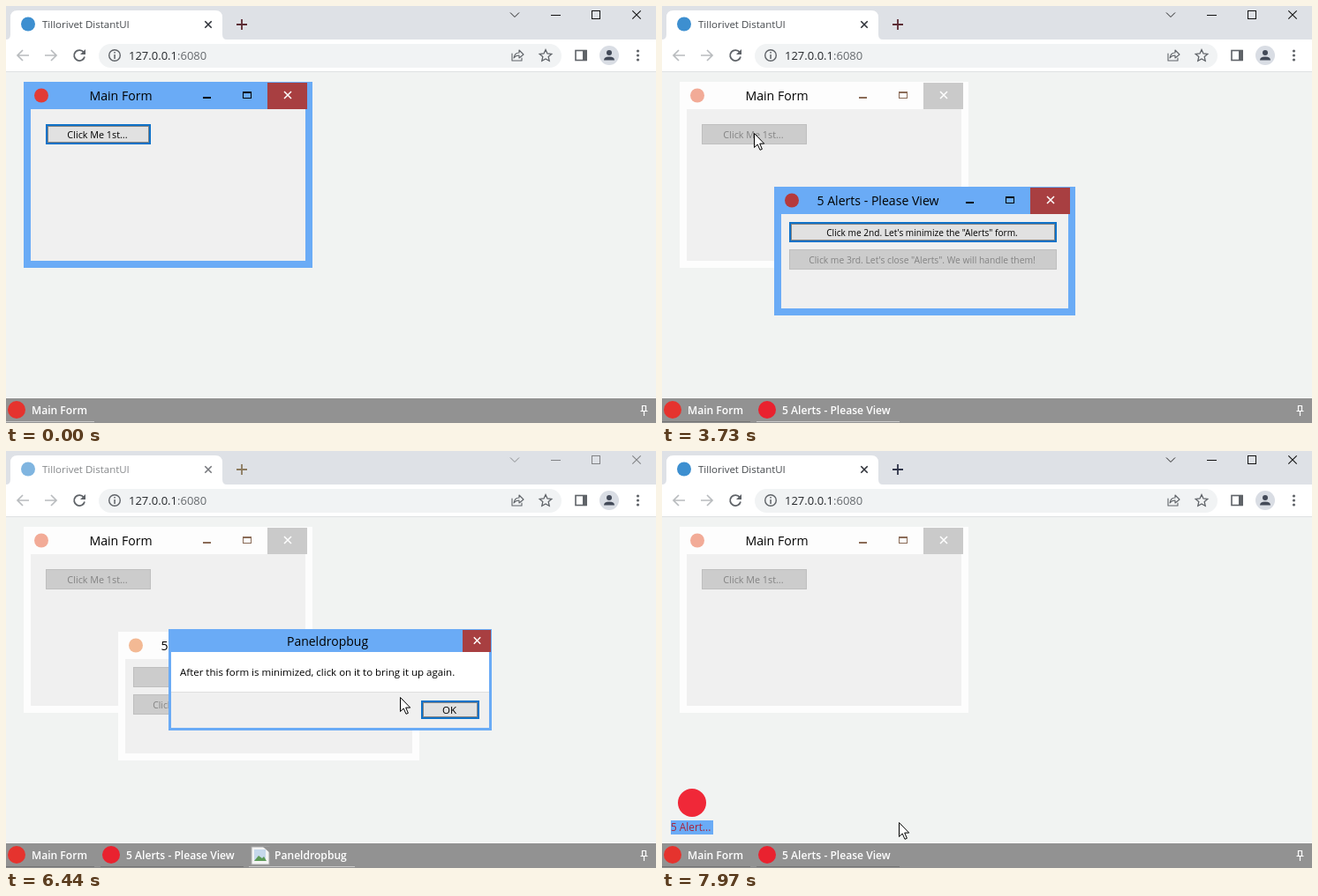
An HTML page for the animation above (8 s loop, 736x473 px).

```html
<!DOCTYPE html>
<html lang="en">
<head>
<meta charset="utf-8">
<title>Forms demo</title>
<style>
  html, body { margin: 0; width: 100%; height: 100%; overflow: hidden; background: #f1f3f2; }
  svg { display: block; width: 736px; height: 473px; }
  text { font-family: "Open Sans", "Noto Sans", sans-serif; white-space: pre; }
</style>
</head>
<body>
<svg id="stage" viewBox="0 0 736 473"></svg>
<script>
const LOOP = 8000;
const BLUE = '#6aabf6', FACE = '#f0f0f0';

const rect = (x, y, w, h, fill, extra = '') =>
  `<rect x="${x}" y="${y}" width="${w}" height="${h}" fill="${fill}" ${extra}/>`;
const frame = (x, y, w, h, color, extra = '') =>
  rect(x + .5, y + .5, w - 1, h - 1, 'none', `stroke="${color}" ${extra}`);
const dot = (x, y, r, fill, extra = '') => `<circle cx="${x}" cy="${y}" r="${r}" fill="${fill}" ${extra}/>`;
const line = (d, color, width = 1, extra = '') =>
  `<path d="${d}" fill="none" stroke="${color}" stroke-width="${width}" ${extra}/>`;
const text = (x, y, size, fill, str, extra = '') =>
  `<text x="${x}" y="${y}" font-size="${size}" fill="${fill}" ${extra}>${str}</text>`;
const centered = (x, y, size, fill, str) => text(x, y, size, fill, str, 'text-anchor="middle"');
const group = (id, body) => `<g id="${id}">${body}</g>`;
const cross = (x, y, r, color, width) =>
  line(`M${x - r} ${y - r}l${2 * r} ${2 * r}M${x + r} ${y - r}l${-2 * r} ${2 * r}`, color, width);

function disabledButton(x, y, w, h, label, size) {
  return rect(x, y, w, h, '#cccccc') + frame(x, y, w, h, '#bfbfbf') +
    centered(x + w / 2 - 1, y + h / 2 + 4, size, '#838383', label);
}

function focusButton(id, x, y, w, h, label, size) {
  const dots = frame(x + 2, y + 2, w - 4, h - 4, '#222', 'stroke-dasharray="1 1"');
  return rect(x, y, w, h, '#e1e1e1') +
    rect(x + 1, y + 1, w - 2, h - 2, 'none', 'stroke="#0f72c8" stroke-width="2"') + dots +
    group(id, rect(x, y, w, h, '#deeefa') + frame(x, y, w, h, '#1f5f92') + dots) +
    centered(x + w / 2 - 1, y + h / 2 + 4, size, '#000', label);
}

function formWindow(x, y, w, h, title, titleX, active, iconColor) {
  const right = x + w, mid = y + 15, ink = active ? '#000' : '#8a6b57';
  return rect(x, y, w, h, active ? BLUE : '#fdfdfd') +
    rect(x + 8, y + 31, w - 16, h - 39, FACE) +
    dot(x + 20, y + 15.5, 8, iconColor) +
    centered(titleX, y + 21, 14.1, '#000', title) +
    rect(right - 124, mid + 2, 9, 2, ink) +
    frame(right - 79, mid - 4, 10, 8, ink) + rect(right - 79, mid - 4, 10, 2, ink) +
    rect(right - 51, y + 1, 45, 30, active ? '#a83f41' : '#cacaca') +
    cross(right - 28, mid, 4, '#fff', 1.5);
}

function mainForm(active) {
  const button = active ? focusButton('hotFirst', 45, 134, 119, 23, 'Click Me 1st...', 10.8)
    : disabledButton(45, 134, 119, 23, 'Click Me 1st...', 10.8);
  return formWindow(20, 86, 327, 211, 'Main Form', 130, active, active ? '#e23b36' : '#f2ab97') + button;
}

function alertsForm(active) {
  const label = 'Click me 2nd. Let\'s minimize the "Alerts" form.';
  const button = active ? focusButton('hotSecond', 144, 245, 303, 23, label, 10.15)
    : disabledButton(144, 245, 303, 23, label, 10.15);
  return formWindow(127, 205, 341, 146, '5 Alerts - Please View', 244.5, active, active ? '#b53a3c' : '#f3b994') +
    button + disabledButton(144, 276, 303, 23, 'Click me 3rd. Let\'s close "Alerts". We will handle them!', 10.3);
}

function dialog() {
  return rect(184, 202, 366, 115, BLUE) + rect(187, 228, 360, 46, '#fff') +
    rect(187, 273, 360, 41, FACE) + rect(187, 273, 360, 1, '#dfdfdf') +
    centered(364, 221, 14, '#000', 'Paneldropbug') +
    rect(517, 203, 32, 25, '#a83f41') + cross(533.5, 215, 3.7, '#fff', 1.5) +
    text(197, 255, 11.5, '#000', 'After this form is minimized, click on it to bring it up again.') +
    focusButton('hotOk', 470, 283, 66, 21, 'OK', 11.5);
}

function browser() {
  const ink = '#5f6368', round = 'stroke-linecap="round" stroke-linejoin="round"';
  const arrow = (x, dir) => line(`M${x - 6 * dir} 56h${13 * dir}M${x} 50l${-6 * dir} 6l${6 * dir} 6`, '#b9bcbf', 1.7);
  return rect(0, 0, 736, 38, '#dee1e6') +
    '<path d="M0 38q5 0 5-6V13q0-8 8-8h224q8 0 8 8v19q0 6 5 6z" fill="#fff"/>' +
    rect(0, 38, 736, 36, '#fff') + rect(0, 74, 736, 1, '#dfe1e3') +
    group('tab', dot(25, 20.5, 8, '#3d8fd0') + text(41, 25, 11.5, '#45494d', 'Tillorivet DistantUI') +
      cross(229, 21, 3.7, '#2e3138', 1.6)) +
    group('plus', '<path d="M261 21h12M267 15v12" fill="none" stroke-width="1.8"/>') +
    group('controls', line('M571 7.5l5 5 5-5', '#222') + rect(617, 10, 11, 1, '#111') +
      frame(663, 5, 10, 10, '#111') + cross(714, 10, 4.7, '#111', 1.1)) +
    arrow(19, 1) + arrow(51, -1) +
    line('M88 52.5a6 6 0 1 0 1 5', ink, 1.8) + `<path d="M90 49v6h-6z" fill="${ink}"/>` +
    rect(105, 43, 524, 27, '#f1f3f4', 'rx="13.5"') +
    dot(123, 56, 6.3, 'none', `stroke="${ink}" stroke-width="1.4"`) +
    rect(122.3, 55, 1.5, 5, ink) + rect(122.3, 52, 1.5, 1.6, ink) +
    `<text x="139" y="60.5" font-size="13" fill="#25282c">127.0.0.1<tspan fill="#666a6e">:6080</tspan></text>` +
    line('M573 54v8h11v-3M575 59q1-6 6-6v-3l5 5-5 4v-3q-4 0-6 3', ink, 1.1, round) +
    line('M611 49.5l2 4.4 4.8.5-3.6 3.2 1 4.7-4.2-2.4-4.2 2.4 1-4.7-3.6-3.2 4.8-.5z', ink, 1.3) +
    rect(645, 50.5, 12, 11, 'none', `stroke="${ink}" stroke-width="1.6"`) + rect(653, 50, 5, 12, ink) +
    dot(683, 56, 11, '#d9dde4') + dot(683, 53, 3, '#434a58') +
    '<path d="M677 61.5q0-4 6-4t6 4z" fill="#434a58"/>' +
    [51, 56, 61].map(y => dot(715.5, y, 1.6, ink)).join('');
}

function taskItem(id, x, w, label, icon) {
  return group(id, icon + text(x + 29, 463, 12.1, '#fff', label, 'font-weight="600"') +
    `<rect id="${id}Line" x="${x}" y="471" width="${w}" height="1"/>`);
}

function taskbar() {
  const broken = rect(278, 449, 20, 20, '#f4f4f4', 'stroke="#aaa"') + rect(281, 452, 13, 13, '#c6d8ec') +
    '<path d="M281 465l5-6 4 3 2-2 3 5z" fill="#5c9a57"/><path d="M291 449h8v7z" fill="#929292"/>';
  return rect(0, 444, 736, 1, '#fafafa') + rect(0, 445, 736, 28, '#929292') +
    taskItem('taskMain', 0, 100, 'Main Form', dot(12, 458, 10, '#e5332e')) +
    taskItem('taskAlerts', 107, 162, '5 Alerts - Please View', dot(119, 458, 10, '#e9222f')) +
    taskItem('taskDialog', 275, 120, 'Paneldropbug', broken) +
    line('M720.5 453.5h4v6h-4zM718.5 459.5h8M722.5 460v5', '#fff', 1.2);
}

const minimized = dot(34, 399, 16, '#f02838') + rect(10, 419, 48, 16, BLUE) +
  text(10, 431, 11.8, '#a8213a', '5 Alert...');
const pointer = '<path d="M.5 .5v16l3.7-3.5 2.8 6.3 2.4-1-2.7-6.2h5z" fill="#fff" stroke="#000"/>';

document.getElementById('stage').innerHTML = rect(0, 0, 736, 473, '#f1f3f2') + browser() +
  group('mainOn', mainForm(true)) + group('mainOff', mainForm(false)) +
  group('alertsOn', alertsForm(true)) + group('alertsOff', alertsForm(false)) +
  group('dialog', dialog()) + group('minimized', minimized) + taskbar() + group('pointer', pointer);

const el = {};
document.querySelectorAll('[id]').forEach(node => el[node.id] = node);

// Each entry holds its value from its time until the next one.
const opacity = {
  mainOff: [[0, 0], [2640, .35], [2720, .7], [2800, 1]],
  alertsOn: [[0, 0], [3050, 1], [7160, 0]],
  alertsOff: [[0, 0], [5100, .5], [5190, 1], [7160, 0]],
  dialog: [[0, 0], [5440, 1], [7080, 0]],
  minimized: [[0, 0], [7160, 1]],
  taskAlerts: [[0, 0], [3050, 1]],
  taskDialog: [[0, 0], [5930, 1], [7080, 0]],
  hotFirst: [[0, 0], [1890, .4], [1970, .8], [2050, 1]],
  hotSecond: [[0, 0], [4550, .25], [4630, .5], [4700, .7], [4950, 1]],
  hotOk: [[0, 0], [6600, .4], [6680, .7], [6770, 1]],
  tab: [[0, 1], [5190, .65], [6770, 1]],
  controls: [[0, 1], [5190, .45], [6770, 1]],
  pointer: [[0, 0], [820, 1]]
};
const LIT = '#c9c9c9', DIM = '#747474';
const colors = {
  taskMainLine: [[0, LIT], [3050, DIM]],
  taskAlertsLine: [[0, LIT], [5190, DIM]],
  taskDialogLine: [[0, LIT]],
  plus: [[0, '#5c2c34'], [5190, '#8c7a5e'], [6770, '#30354a']]
};

// start, end, steps, from, to
const moves = [
  [820, 1550, 9, [116, 427], [98, 152]],
  [1550, 1640, 1, [98, 152], [104, 144]],
  [3730, 4460, 9, [104, 144], [238, 252]],
  [5848, 6680, 10, [238, 252], [492, 285]],
  [7250, 7970, 9, [492, 285], [268, 421]]
];

const held = (steps, t) => steps.filter(([at]) => at <= t).pop()[1];
const ease = u => u < .5 ? 2 * u * u : 1 - 2 * (1 - u) ** 2;

function pointerAt(t) {
  const [start, end, steps, from, to] = moves.filter(m => m[0] <= t).pop() || moves[0];
  const u = Math.min(1, Math.max(0, (t - start) / (end - start)));
  const k = ease(Math.floor(u * steps + 1e-6) / steps);
  return from.map((v, i) => Math.round(v + (to[i] - v) * k));
}

function render(t) {
  for (const id in opacity) {
    const value = held(opacity[id], t);
    el[id].style.opacity = value;
    el[id].style.visibility = value ? 'visible' : 'hidden';
  }
  for (const id in colors) el[id].setAttribute(id === 'plus' ? 'stroke' : 'fill', held(colors[id], t));
  if (t < 3050 || t >= 7160) el.hotSecond.style.visibility = 'hidden';
  if (t < 5440 || t >= 7080) el.hotOk.style.visibility = 'hidden';
  el.pointer.setAttribute('transform', `translate(${pointerAt(t)})`);
}

const begin = performance.now();
function tick() {
  render((performance.now() - begin) % LOOP);
  requestAnimationFrame(tick);
}
tick();
</script>
</body>
</html>
```
